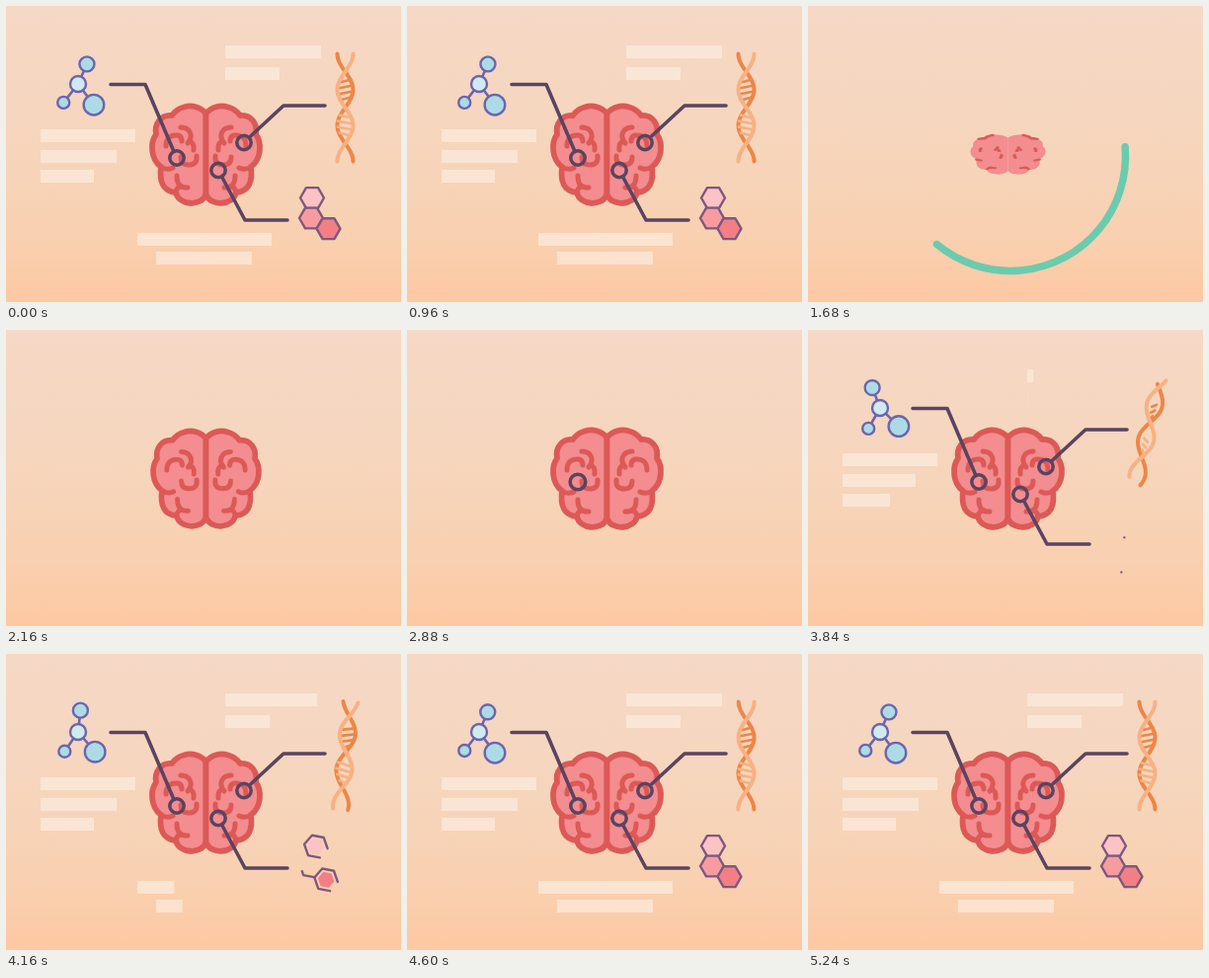
These frames come from a looping animation (400x300 px, 5.28 s). An HTML page with a canvas:

```html
<!DOCTYPE html>
<html lang="en">
<head>
<meta charset="utf-8">
<title>Brain infographic</title>
<style>
html, body { margin: 0; width: 100%; height: 100%; overflow: hidden; background: #f8d3b8; }
canvas { display: block; }
</style>
</head>
<body>
<canvas id="stage" width="400" height="300"></canvas>
<script>
const c = document.getElementById('stage').getContext('2d');
const LOOP = 5280, HOLD = 1280, RAD = Math.PI / 180;
const INK = '#5a4460', RED = '#dc5956', PINK = '#f38d8f';
let t = 0;

const part = (start, length) => Math.min(1, Math.max(0, (t - start) / length));
const smooth = (start, length) => {
  const p = part(start, length);
  return p < .5 ? 4 * p ** 3 : 1 - 4 * (1 - p) ** 3;
};
const pop = (start, length) => {
  const q = part(start, length) - 1;
  return q === -1 ? 0 : 1 + 2.7 * q ** 3 + 1.7 * q * q;
};
// Quadratic settling, 1 at `at` and 0 from `end` on
const settle = (at, end) => (Math.max(0, end - t) / (end - at)) ** 2;

function stroke(color, width, path) {
  c.strokeStyle = color;
  c.lineWidth = width;
  path ? c.stroke(path) : c.stroke();
}

function trace(path, length, f, color, width) {
  if (f <= 0) return;
  c.setLineDash(f < 1 ? [length * f, 9999] : []);
  stroke(color, width, path);
  c.setLineDash([]);
}

function disc(x, y, r, fill, color, width) {
  if (r <= 0) return;
  c.beginPath();
  c.arc(x, y, r, 0, 7);
  if (fill) { c.fillStyle = fill; c.fill(); }
  stroke(color, width);
}

function turned(x, y, angle, draw) {
  c.save();
  c.translate(x, y);
  c.rotate(angle * RAD);
  draw();
  c.restore();
}

const sky = c.createLinearGradient(0, 0, 0, 300);
[[0, '#f5d8c6'], [.5, '#f6d5bb'], [.78, '#f9d0b0'], [1, '#fdc8a2']].forEach(s => sky.addColorStop(...s));

// Left half of the brain; the right half is its mirror image
const half = new Path2D('M180 102.500C174 104 170 108 168 111C157 110 150 119 152 130' +
  'C146 138 146 155 157 163C155 178 159 188 172 189C175 202 197 204 202.500 191V109C197 102 188 100 180 102.500Z');
const curls = [
  'M162 142q0-12 12-11q4 1 4 6', 'M186 137q5 2 4 9', 'M184 139q6-7 1-13q-3-3-8-3',
  'M193 152q1 9-8 9q-8 0-8-8', 'M184 184q-11 1-11-12', 'M178 183q-5 0-6 6', 'M157 163q6 4 12 1'
].map(d => new Path2D(d));

function brain() {
  const sx = pop(1600, 400), sy = pop(1640, 400);
  if (!sx || !sy) return;
  const size = .98 + .02 * smooth(2400, 300);
  c.save();
  c.translate(202.5, 150.5);
  c.scale(sx * size, sy * size);
  for (const side of [1, -1]) {
    c.save();
    c.scale(side, 1);
    c.translate(-202.5, -150.5);
    c.fillStyle = PINK;
    c.fill(half);
    for (const curl of curls) trace(curl, 26, smooth(1500, 450), RED, 5);
    trace(half, 310, smooth(1576, 400), RED, 5.8);
    c.restore();
  }
  c.restore();
}

function ring() {
  const head = smooth(1411, 500), tail = smooth(1486, 500);
  if (head <= tail) return;
  c.beginPath();
  c.arc(205, 152, 116.5, (head * 360 - 90) * RAD, (tail * 360 - 90) * RAD, true);
  stroke('#6bcbae', 7.5);
}

function pointer(start, x, y, points) {
  const path = new Path2D();
  let length = 0;
  points.forEach(([px, py], i) => {
    path.lineTo(px, py);
    if (i) length += Math.hypot(px - points[i - 1][0], py - points[i - 1][1]);
  });
  trace(path, length, smooth(start, 500), INK, 3.6);
  disc(x, y, 7.2 * pop(start - 200, 280), null, INK, 3.5);
}

function bar(start, x, y, width) {
  c.fillStyle = 'rgba(252,238,226,.66)';
  c.fillRect(x, y, width * smooth(start, 600), 13);
}

function molecule() {
  const line = '#6c65ae', s = settle(3520, 4700);
  // final angle, swing, length, growth start, radius, node start
  const arms = [[-66, -85, 22, 3420, 7.5, 3540], [128, -16, 24, 3330, 6, 3530], [53, -16, 26.5, 3250, 10.3, 3470]]
    .map(([angle, swing, length, start, r, node]) => {
      const a = (angle + swing * s) * RAD, l = length * smooth(start, 330);
      return [73 + l * Math.cos(a), 79 + l * Math.sin(a), r * pop(node, 250), l];
    });
  for (const [x, y, , l] of arms) {
    if (!l) continue;
    c.beginPath();
    c.moveTo(73, 79);
    c.lineTo(x, y);
    stroke(line, 2.6);
  }
  for (const [x, y, r] of arms) disc(x, y, r, '#addbe5', line, 2.4);
  disc(73, 79, 8 * pop(3200, 280), '#d0ebef', line, 2.4);
}

function dna() {
  const grown = smooth(3364, 600), s = settle(3520, 4700);
  if (!grown) return;
  const dark = '#ee8646', light = '#f8b182';
  const wave = y => 8 * Math.cos(Math.PI * (y + 54.5) / 36.33 + s * Math.PI / 2);
  const strand = (sign, from, color) => {
    c.beginPath();
    for (let i = 0; i <= 60 * grown; i++) {
      const y = from * (54.5 - 109 * i / 60);
      c.lineTo(sign * wave(y), y);
    }
    stroke(color, 4);
  };
  turned(343.5 + 1.5 * s, 103, 26 * s, () => {
    strand(-1, 1, dark);
    const rungs = smooth(3700, 350);
    if (rungs) for (const mid of [-18, 18]) for (const step of [-9, -3, 3, 9]) {
      const y = mid + step, w = Math.abs(wave(y)) * rungs;
      c.beginPath();
      c.moveTo(-w, y + (mid < 0 ? 1.5 : -1.5));
      c.lineTo(w, y + (mid < 0 ? -1.5 : 1.5));
      stroke(mid < 0 ? dark : light, 2.7);
    }
    strand(1, -1, light);
  });
}

function hexagon(r) {
  const path = new Path2D();
  for (let i = 1; i < 7; i++) path.lineTo(r * Math.cos(i * 60 * RAD), r * Math.sin(i * 60 * RAD));
  path.closePath();
  return path;
}

function cells() {
  turned(309, 215, 11 * settle(4160, 4600), () => {
    for (const [x, y, color, start, fill] of [
      [1, -20.5, '#fbc3c4', 3835, 3871], [0, 0, '#f69c9e', 3970, 4130], [17.5, 10.7, '#f37f85', 3835, 3871]
    ]) turned(x, y, 0, () => {
      c.fillStyle = color;
      c.fill(hexagon(12 * smooth(fill, 500)));
      trace(hexagon(12), 72, smooth(start, 500), '#7e587f', 2.4);
    });
  });
}

function frame(now) {
  t = now % LOOP;
  if (t < HOLD) t = LOOP;
  c.lineCap = c.lineJoin = 'round';
  c.fillStyle = sky;
  c.fillRect(0, 0, 400, 300);
  ring();
  brain();
  [[3276, 35, 125, 96], [3368, 35, 146, 77], [3421, 35, 166, 54],
   [3690, 222, 40, 97], [3774, 222, 62, 55],
   [3915, 133, 230, 136], [3915, 152, 249, 97]].forEach(b => bar(...b));
  pointer(2900, 173, 154, [[170, 147.5], [141, 79.5], [106, 79.5]]);
  pointer(3135, 241, 138.5, [[246.5, 133], [281, 101], [323, 101]]);
  pointer(3362, 215, 166.5, [[218.5, 173], [242, 217], [285, 217]]);
  molecule();
  dna();
  cells();
  requestAnimationFrame(frame);
}

const begin = performance.now();
const run = frame;
frame(0);
function frameTime() { return performance.now() - begin; }
</script>
</body>
</html>
```
